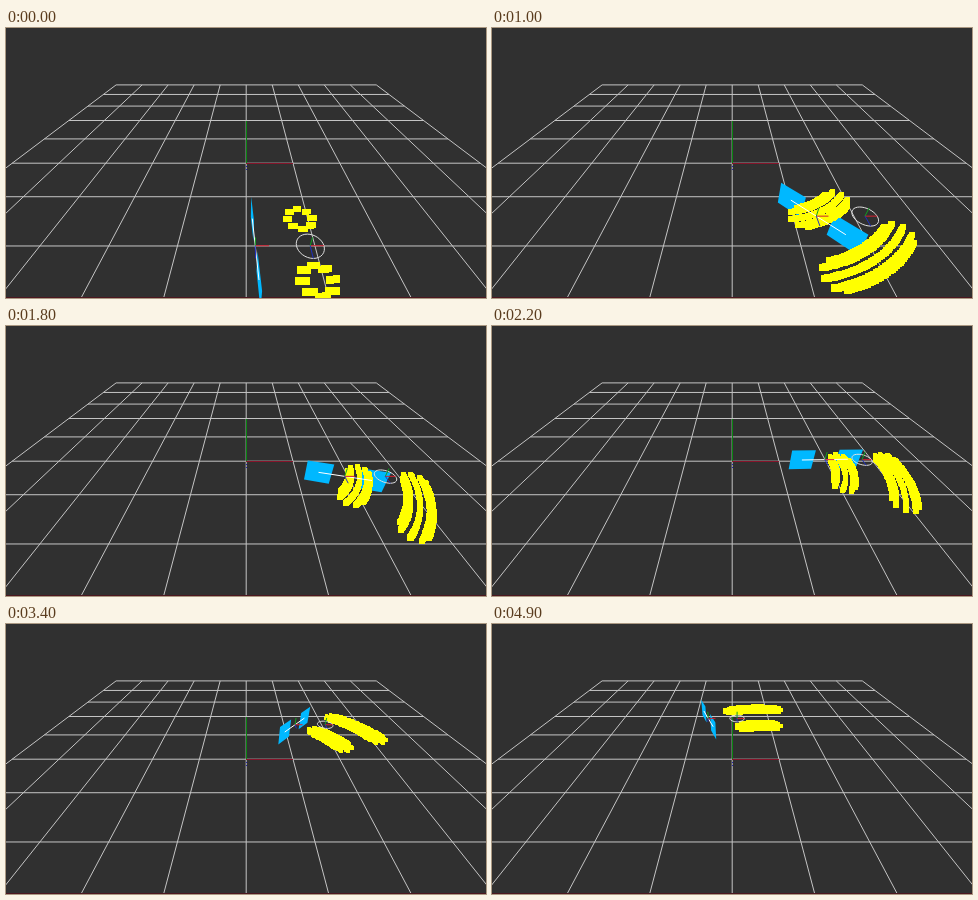
Recreate the animation shown at these times as an HTML page. Size 480 by 270 pixels, loop 5 s.

```html
<!DOCTYPE html>
<html lang="en">
<head>
<meta charset="utf-8">
<title>Orbiting axle</title>
<style>
  html, body { margin: 0; width: 100%; height: 100%; overflow: hidden; background: #303030; }
  svg { display: block; width: 100vw; height: 100vh; }
  path { fill: none; stroke-width: 1; }
</style>
</head>
<body>
<svg viewBox="0 0 480 270" id="stage"></svg>
<script>
const stage = document.getElementById('stage');

// Camera looking at the world centre: x right, y away, z up.
const PITCH = 37 * Math.PI / 180;
const SIN = Math.sin(PITCH), COS = Math.cos(PITCH);
const FOCAL = 234, DIST = 5;

const LOOP = 5000, STEP = 100;
const START = -1.505, RATE = 0.697;  // orbit angle in rad, rad/s
const SHIFT = 0.8;                   // x offset of the second orbit
const TRAIL = 0.53, LEAD = 0.035;    // trail length, trail before the start

function project(x, y, z = 0) {
  const scale = FOCAL / (DIST + y * COS - z * SIN);
  return { x: 240.2 + x * scale, y: 135.2 - (y * SIN + z * COS) * scale, scale };
}

function polyline(points) {
  return 'M' + points.map(p => {
    const q = project(...p);
    return q.x.toFixed(2) + ' ' + q.y.toFixed(2);
  }).join('L');
}

function layer(attrs, d = '') {
  const path = document.createElementNS('http://www.w3.org/2000/svg', 'path');
  for (const key in attrs) path.setAttribute(key, attrs[key]);
  path.setAttribute('d', d);
  stage.appendChild(path);
  return path;
}

function gridPath() {
  let d = '';
  for (let i = -5; i <= 5; i++) {
    d += polyline([[i, -3, 0], [i, 5, 0]]);
    if (i >= -3) d += polyline([[-5, i, 0], [5, i, 0]]);
  }
  return d;
}

const crisp = { 'shape-rendering': 'crispEdges' };
layer({ stroke: '#c4c4c4' }, gridPath());
layer({ stroke: '#85142a', ...crisp }, polyline([[0, 0, 0], [1, 0, 0]]));
layer({ stroke: '#0a8512', ...crisp }, polyline([[0, 0, 0], [0, 0, 1]]));
layer({ stroke: '#2020b0', 'stroke-dasharray': '1 2', ...crisp }, 'M240.2 138V144');
layer({ stroke: '#4c1820', ...crisp }, 'M0 269.5H480');

const panels = layer({ style: 'fill:#00b8ff' });
const dots = layer({ style: 'fill:#ffff00', ...crisp });
const axle = layer({ stroke: '#ffffff' });
const circle = layer({ stroke: '#e0e0e0' });
const axes = ['#d02030', '#10a020', '#2030c0'].map(stroke => layer({ stroke }));

const onOrbit = (r, a, z = 0) => [r * Math.cos(a), r * Math.sin(a), z];

function panelPath(r, a) {
  const h = 0.25;
  return polyline([
    onOrbit(r - h, a, h), onOrbit(r + h, a, h),
    onOrbit(r + h, a, -h), onOrbit(r - h, a, -h)
  ]) + 'Z';
}

// Each ring has eight square dots that face the viewer and leave trails.
function ringPath(r, a, length) {
  let d = '';
  for (let lag = 0; lag <= length; lag += 0.0175) {
    const c = Math.cos(a - lag), s = Math.sin(a - lag);
    for (let i = 0; i < 8; i++) {
      const turn = i * Math.PI / 4;
      const out = r + 0.2 * Math.cos(turn), ahead = 0.2 * Math.sin(turn);
      const p = project(SHIFT + out * c - ahead * s, out * s + ahead * c);
      const size = 0.1 * p.scale;
      const x0 = Math.round(p.x - size / 2), x1 = Math.round(p.x + size / 2);
      const y0 = Math.round(p.y - size / 2), y1 = Math.round(p.y + size / 2);
      d += `M${x0} ${y0}H${x1}V${y1}H${x0}Z`;
    }
  }
  return d;
}

function circlePath(cx, cy) {
  const points = [];
  for (let i = 0; i < 32; i++) {
    const [x, y] = onOrbit(0.2, i * Math.PI / 16);
    points.push([cx + x, cy + y, 0]);
  }
  return polyline(points) + 'Z';
}

function axisPath([x, y], k) {
  const tip = [[x + 0.2, y, 0], [x, y, 0.2], [x, y - 0.2, 0]][k];
  return polyline([[x, y, 0], tip]);
}

function draw(ms) {
  const t = Math.floor(ms / STEP) * STEP / 1000;
  const a = START + RATE * t;
  const length = Math.min(TRAIL, RATE * t + LEAD);
  const mid = onOrbit(2, a);
  const body = [mid[0] + SHIFT, mid[1]];

  panels.setAttribute('d', panelPath(2.5, a) + panelPath(1.5, a));
  dots.setAttribute('d', ringPath(1.5, a, length) + ringPath(2.5, a, length));
  axle.setAttribute('d', polyline([onOrbit(1.5, a), onOrbit(2.5, a)]));
  circle.setAttribute('d', circlePath(...body));
  axes.forEach((path, k) => path.setAttribute('d', axisPath(mid, k) + axisPath(body, k)));
}

const begin = performance.now();
function tick() {
  draw((performance.now() - begin) % LOOP);
  requestAnimationFrame(tick);
}
tick();
</script>
</body>
</html>
```
